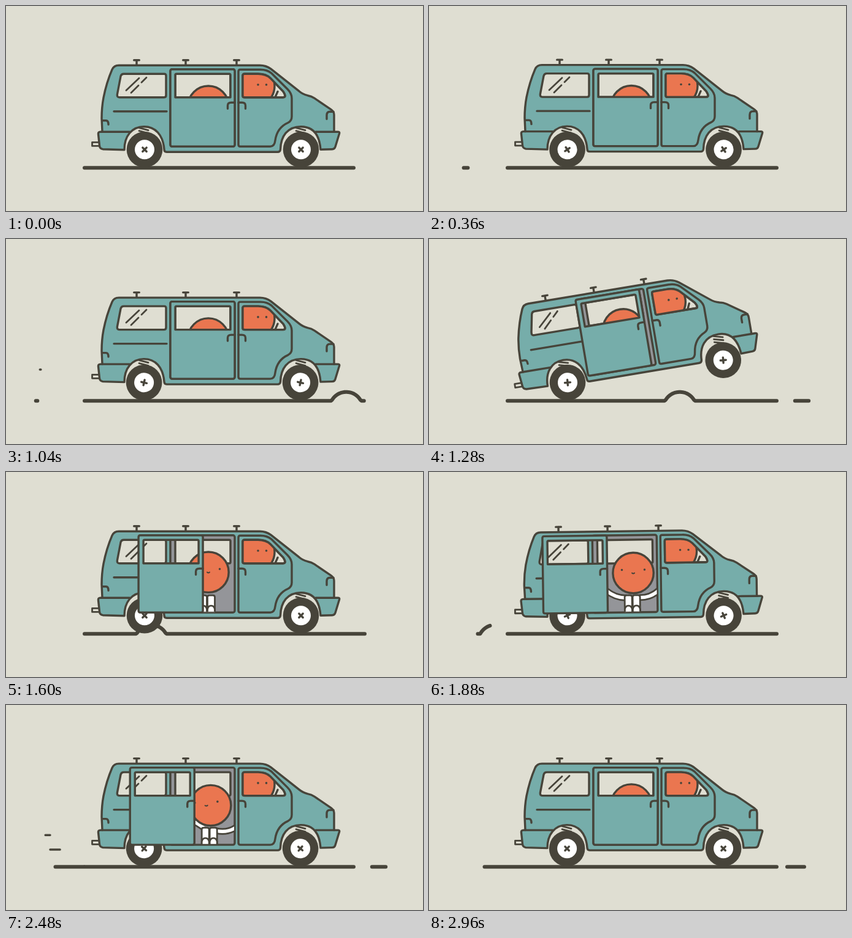
Write an HTML page that moves like this. It is 680 by 336 pixels and loops after 3000 ms.

```html
<!DOCTYPE html>
<html lang="en">
<head>
<meta charset="utf-8">
<title>Van ride</title>
<style>
  html, body { margin: 0; width: 100%; height: 100%; overflow: hidden; background: #dfded2; }
  svg { display: block; width: 680px; height: 336px; }
  .ink { stroke: #47443a; stroke-width: 3.4; stroke-linecap: round; stroke-linejoin: round; fill: none; }
  .teal { fill: #76adaa; }
  .pale { fill: #dfded2; }
  .grey { fill: #949599; }
  .skin { fill: #ea7650; }
  .white { fill: #fff; }
  .dark { fill: #47443a; stroke: none; }
  .thin { stroke-width: 2.8; }
</style>
</head>
<body>
<svg viewBox="0 0 680 336">
  <defs>
    <clipPath id="opening"><rect x="269" y="104" width="103" height="125"/></clipPath>
    <path id="pane" d="M389 111H411Q424 111 431 118L452 140Q458 149.500 452 149.500H389Q386 149.500 386 147V114Q386 111 389 111Z"/>
    <clipPath id="paneClip"><use href="#pane"/></clipPath>
    <g id="wheel">
      <circle class="dark" r="29.300"/>
      <circle class="white" r="16"/>
      <path class="ink" d="M-4.500 0H4.500M0 -4.500V4.500"/>
    </g>
    <path id="spring" class="ink thin" d="M-8 199.500L7 203.500M-8 204.500L7 208.500M-8 209.500L7 213.500"/>
    <path id="rail" class="ink" d="M-4.300 88.500H4.300M0 88.500V96"/>
    <g id="leg" class="ink thin">
      <path class="white" d="M-6 230V205Q-6 202 -3 202H3Q6 202 6 205V230Z"/>
      <path class="white" d="M-6 230V225Q-5 219 0 219Q5 219 6 225V230Z"/>
    </g>
  </defs>

  <path id="ground" class="ink" style="stroke-width:6"/>
  <path id="puffs" class="ink"/>

  <g id="back" class="ink">
    <rect class="pale thin" x="140.500" y="223.200" width="14" height="6"/>
    <use href="#rail" x="213"/><use href="#rail" x="293"/><use href="#rail" x="376"/>
    <use href="#spring" x="225"/><use href="#spring" x="481"/>
    <path class="teal" d="M157 206L156 184Q156 166 159 150Q164 125 173 104Q176 97 184 97H414Q424 97 432 103L478 139.500Q484 144.500 492 146.500Q498 147.500 503 151L530 169.500Q535 173 535 178V206H541Q544.500 206 543.500 209L537 230.500Q536 234.500 532 234.500L513 235C511 208 499 197.500 481 197.500C459 197.500 448 213 447.500 235Q447 239 443 239H262Q258 239 258 235C256 210 243 197.500 225 197.500C205 197.500 193 213 193 235.500L158 234.500Q153 233.500 152.500 229L150.500 210Q150 206 154 206Z"/>
    <path d="M157 206H202M505 206H535M176 172.500H262M157 187.500H163Q167 187.500 167 194M534 173H528Q523 173 523 179V185"/>
    <path class="pale" d="M192 111H258Q261 111 261 114V146Q261 149.500 258 149.500H185Q180.500 149.500 181.500 144L187 115Q188 111 192 111Z"/>
    <path class="thin" d="M196 138L217 118M204 142L216 130M221 125L229 117"/>
  </g>

  <use id="rear" href="#wheel"/>
  <use id="front" href="#wheel"/>

  <g id="cabin" class="ink">
    <rect class="grey" x="268" y="103.500" width="105" height="126.500" rx="3"/>
    <rect class="pale" x="276" y="111" width="90" height="38.500" rx="2"/>
    <g clip-path="url(#opening)">
      <path id="armsEdge" style="stroke-width:11;stroke-linecap:butt"/>
      <path id="armsFill" style="stroke:#fff;stroke-width:5.500;stroke-linecap:butt"/>
      <g id="rider">
        <use href="#leg" x="-8.500"/><use href="#leg" x="4.500"/>
        <g id="head">
          <circle class="skin" cy="164" r="33.200"/>
          <g id="face">
            <circle class="dark" cx="-18.500" cy="158.800" r="1.800"/>
            <circle class="dark" cx="18.500" cy="158.800" r="1.800"/>
            <path class="thin" style="stroke-width:2" d="M-2 164Q0 166 2 164"/>
          </g>
        </g>
      </g>
    </g>

    <g id="door">
      <path class="teal" fill-rule="evenodd" d="M271 103.500H370Q373 103.500 373 106.500V227Q373 230 370 230H271Q268 230 268 227V106.500Q268 103.500 271 103.500ZM278 111Q276 111 276 113V149.500H366V113Q366 111 364 111Z"/>
      <path d="M361.500 168V163Q361.500 158 367 158H373"/>
    </g>

    <path class="teal" d="M382 104H415Q426 104 433 110L459 136Q466 143 466 151V181Q466 188 460 191Q442 199 439 220Q438 230 431 230H382Q379 230 379 227V107Q379 104 382 104Z"/>
    <path d="M379 158H385Q390.500 158 390.500 163V168"/>
    <use class="pale" href="#pane"/>
    <g clip-path="url(#paneClip)">
      <circle class="skin" cx="405" cy="131" r="33"/>
      <path d="M439 149L443 140"/>
      <circle class="dark" cx="411" cy="128.800" r="1.800"/>
      <circle class="dark" cx="424.500" cy="128.800" r="1.800"/>
    </g>
    <use href="#pane"/>
  </g>
</svg>

<script>
const $ = id => document.getElementById(id);
const set = (id, name, value) => $(id).setAttribute(name, value);
const clamp = x => Math.max(0, Math.min(1, x));
const smooth = x => (x = clamp(x)) * x * (3 - 2 * x);

const REAR = 226, FRONT = 481, AXLE = 235.3, GROUND = 265.3;
const FRONT_HIT = 28.5, REAR_HIT = 40.5, HOP = 6;
const arrivals = [6, 12, 32, 38, 49, 62, 67, 73.5];
const departures = [7, 16.8, 23.5, 57, 62.2, 69.5, 74.7];
const puffs = [[17.4, 214], [15.6, 226], [54.6, 213.3], [55.8, 237]];
const spins = [[0, 45], [18, 607], [32, 985], [40, 1215], [47, 1417], [62, 1840], [74, 2205], [75, 2205]];

function spin(n) {
  const i = spins.findIndex(k => k[0] > n);
  const [a, from] = spins[i - 1], [b, to] = spins[i];
  return from + (to - from) * (n - a) / (b - a);
}

const hop = d => d > 0 && d < HOP ? Math.sin(Math.PI * (d / HOP) ** 0.7) : 0;
const rebound = d => d > HOP && d < HOP + 2 ? Math.sin(Math.PI * (d - HOP) / 2) : 0;

function strip(x0, x1, bump) {
  let d = "";
  for (let x = x0; x < x1 + 2; x += 2) {
    const px = Math.min(x, x1);
    const rise = Math.max(0, Math.sqrt(Math.max(0, 729 - (px - bump) ** 2)) - 12.4);
    d += (d ? "L" : "M") + px.toFixed(1) + " " + (GROUND - rise).toFixed(1);
  }
  return d;
}

function road(n) {
  const k = n - 32;
  const bump = n < 20 || n > 56 ? -999 : 409 - 23.1 * k + 0.2 * k * k;
  let d = strip(128, 567, bump > 140 ? bump : -999);
  const dash = (c, len) => { d += strip(c - len / 2, c + len / 2, -999); };
  for (const t of arrivals) {
    const c = 608 - 20 * (n - t);
    if (c < 645 && c > 540) dash(c, Math.min(34, (648 - c) * 0.56));
  }
  for (const t of departures) {
    const c = 100 - 20 * (n - t);
    if (c > 34 && c < 140) dash(c, 47 * clamp((c - 33) / 71) ** 2);
  }
  if (bump > 538 && bump < 675) d += strip(bump - 29, Math.min(bump + 29, 655), bump);
  if (bump < 140 && bump > 12) d += strip(Math.max(4, bump - 28), bump - 8, bump);
  return d;
}

function wind(n) {
  let d = "";
  for (const [start, y] of puffs) {
    const u = (n - start) / 10;
    if (u <= 0 || u >= 1) continue;
    const x = 142 - 100 * u, half = 10 * Math.sin(Math.PI * u) ** 3;
    d += `M${x - half} ${y}H${x + half + 0.1}`;
  }
  return d;
}

function draw(n) {
  const shake = (1 - Math.cos(Math.PI * n / 2)) / 2;
  const df = n - FRONT_HIT, dr = n - REAR_HIT;
  const rock = 1.1 * (rebound(df) - rebound(dr));
  const body = `translate(0 ${0.2 - 1.1 * shake})
    rotate(${-11.4 * hop(df)} ${REAR} ${AXLE})
    rotate(${11.4 * hop(dr)} ${FRONT} ${AXLE})
    rotate(${rock} ${(REAR + FRONT) / 2} ${AXLE})`;
  set("back", "transform", body);
  set("cabin", "transform", body);

  const wheel = (id, x, h) => {
    const lift = 255 * Math.sin(9.9 * h * Math.PI / 180);
    set(id, "transform", `translate(${x - 0.9 * shake - 1.5 * h} ${AXLE - lift}) rotate(${spin(n)})`);
  };
  wheel("rear", REAR, hop(dr));
  wheel("front", FRONT, hop(df));

  const slide = 82 * (smooth((n - 28.5) / 19.5) - smooth((n - 58) / 14));
  set("door", "transform", `translate(${-slide} 0)`);

  // The rider looks at the door and pulls it shut.
  const lean = smooth((n - 52) / 8);
  const shift = smooth((n - 40) / 7) - smooth((n - 60) / 12);
  const x = 330 + 4 * shift;
  set("rider", "transform", `translate(${x} 0)`);
  set("head", "transform", `translate(0 ${1.6 * shift})`);
  set("face", "transform", `translate(${-7 * lean} 0) rotate(${-3 * lean} 0 164)`);
  const hand = 371 - slide, reach = smooth((n - 41) / 4) * 32;
  const arms = n < 41 ? "" :
    `M${hand} ${194 - 3 * lean}Q${(hand + x) / 2 - 6} ${207 - 11 * lean} ${x - 11} ${206 - 4 * lean}` +
    `M${x + 10 + reach} ${194 + 7 * lean}Q${x + 10 + reach * 0.55} ${207 + 4 * lean} ${x + 9} ${206 + lean}`;
  set("armsEdge", "d", arms);
  set("armsFill", "d", arms);

  set("ground", "d", road(n));
  set("puffs", "d", wind(n));
}

// 75 steps of 40 ms per loop
const start = performance.now();
function tick() {
  draw(Math.floor((performance.now() - start) / 40) % 75);
  requestAnimationFrame(tick);
}
tick();
</script>
</body>
</html>
```
